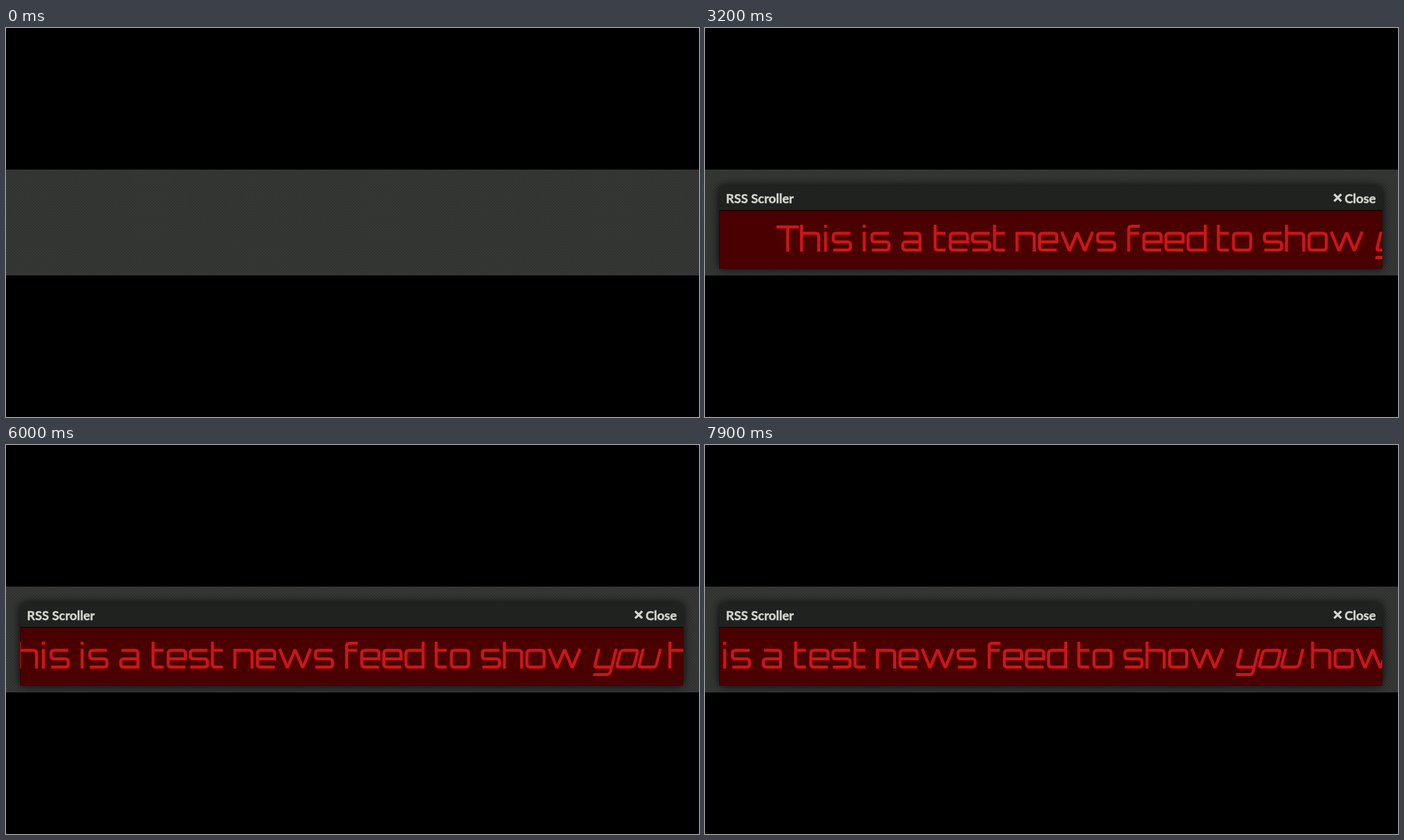
These frames come from a looping animation (928x522 px, 8000 ms). An HTML page:

```html
<!DOCTYPE html>
<html lang="en">
<head>
<meta charset="utf-8">
<title>RSS Scroller</title>
<style>
  html, body { margin: 0; width: 100%; height: 100%; overflow: hidden; background: #000; }
  svg { display: block; width: 100vw; height: 100vh; }
  .label { font: 700 17px Lato, sans-serif; fill: #d6d7d0; stroke: #d6d7d0; stroke-width: .4; }
  .lettering { fill: none; stroke: #cd1518; stroke-width: 4; stroke-linejoin: bevel; }
</style>
</head>
<body>
<svg viewBox="0 0 928 522">
  <defs>
    <pattern id="weave" width="4" height="4" patternUnits="userSpaceOnUse">
      <rect width="4" height="4" fill="#383a38"/>
      <path d="M0 0h1v1h-1zM1 1h1v1h-1zM2 2h1v1h-1zM3 3h1v1h-1zM2 0h1v1h-1zM0 2h1v1h-1z" fill="#2c2e2c"/>
    </pattern>
    <filter id="blur" x="-10%" y="-40%" width="120%" height="180%">
      <feGaussianBlur stdDeviation="6.5"/>
    </filter>
    <clipPath id="window"><rect x="19" y="245" width="888" height="78"/></clipPath>
  </defs>
  <rect width="928" height="522"/>
  <rect y="190" width="928" height="142" fill="url(#weave)"/>
  <g id="panel">
    <rect x="19" y="212" width="888" height="111" rx="5" opacity=".9" filter="url(#blur)"/>
    <path d="M19 245V217q0-5 5-5H902q5 0 5 5V245z" fill="#20221f"/>
    <rect x="19" y="244" width="888" height="79" fill="#4b0000"/>
    <rect x="19.5" y="245.5" width="887" height="77" fill="none" stroke="#000" opacity=".25"/>
    <rect x="19" y="244" width="888" height="1" fill="#1c0504"/>
    <text class="label" x="28" y="234.5">RSS Scroller</text>
    <path d="M842.5 223l9.5 9.5M852 223l-9.5 9.5" stroke="#d6d7d0" stroke-width="3"/>
    <text class="label" x="856.5" y="234.5">Close</text>
    <g clip-path="url(#window)">
      <g id="news" class="lettering" role="img" aria-label="This is a test news feed to show you how"></g>
    </g>
  </g>
</svg>
<script>
const LOOP = 8000, STEP = 100, OPEN_AT = 1100;
const BASELINE = 300, START_X = 433.4, SPEED = 3.975; // px per step

// Each letter: advance and centre-line path, baseline at y = 0
const GLYPHS = {
  T: [31.5, "M0-33H30M15-33V0"],
  a: [29.6, "M3-24.5H21q4 0 4 4V0M25-2H6q-4 0-4-4v-3q0-4 4-4H25"],
  d: [29.6, "M25-36V0M25-2H6q-4 0-4-4V-20.5q0-4 4-4H25"],
  e: [29.6, "M25-2H6q-4 0-4-4V-20.5q0-4 4-4H21q4 0 4 4V-11M25-13H2"],
  f: [20.3, "M2 0V-30q0-4 4-4H17M2-24.5H16"],
  h: [30.2, "M2-36V0M2-24.5H21q4 0 4 4V0"],
  i: [12.3, "M4-36v4M4-26.5V0"],
  n: [30.2, "M2 0V-26.5M2-24.5H21q4 0 4 4V0"],
  o: [29.6, "M6-24.5H21q4 0 4 4V-6q0 4-4 4H6q-4 0-4-4V-20.5q0-4 4-4"],
  s: [29.6, "M25-24.5H6q-4 0-4 4v3.5q0 4 4 4H21q4 0 4 4v3q0 4-4 4H2"],
  t: [20.3, "M2-36V-6q0 4 4 4H16M2-24.5H16"],
  u: [29.6, "M2-26.5V-6q0 4 4 4H21q4 0 4-4V-26.5"],
  w: [48, "M2-26.5L12.5-1L22.75-25.5L33-1L43.5-26.5"],
  y: [29.6, "M2-26.5V-6q0 4 4 4H25M25-26.5V4q0 4-4 4H3"]
};
const WORDS = [
  ["This", -210.5], ["is", -97], ["a", -43.3], ["test", 0], ["news", 109.6],
  ["feed", 259.2], ["to", 379.2], ["show", 440.9], ["you", 590.6, true], ["how", 692.2]
];

const panel = document.getElementById("panel");
const news = document.getElementById("news");

function add(parent, tag, attrs) {
  const el = document.createElementNS(parent.namespaceURI, tag);
  for (const key in attrs) el.setAttribute(key, attrs[key]);
  return parent.appendChild(el);
}

for (const [word, left, italic] of WORDS) {
  const group = add(news, "g", { transform: `translate(${left})${italic ? " skewX(-14)" : ""}` });
  let x = 0;
  for (const letter of word) {
    const [advance, d] = GLYPHS[letter];
    add(group, "path", { d, transform: `translate(${x})` });
    x += advance;
  }
}

function draw(time) {
  const step = Math.floor(time / STEP);
  panel.setAttribute("visibility", time < OPEN_AT ? "hidden" : "visible");
  news.setAttribute("transform", `translate(${START_X - SPEED * step} ${BASELINE})`);
}

const begin = performance.now();
function tick() {
  draw((performance.now() - begin) % LOOP);
  requestAnimationFrame(tick);
}
tick();
</script>
</body>
</html>
```
